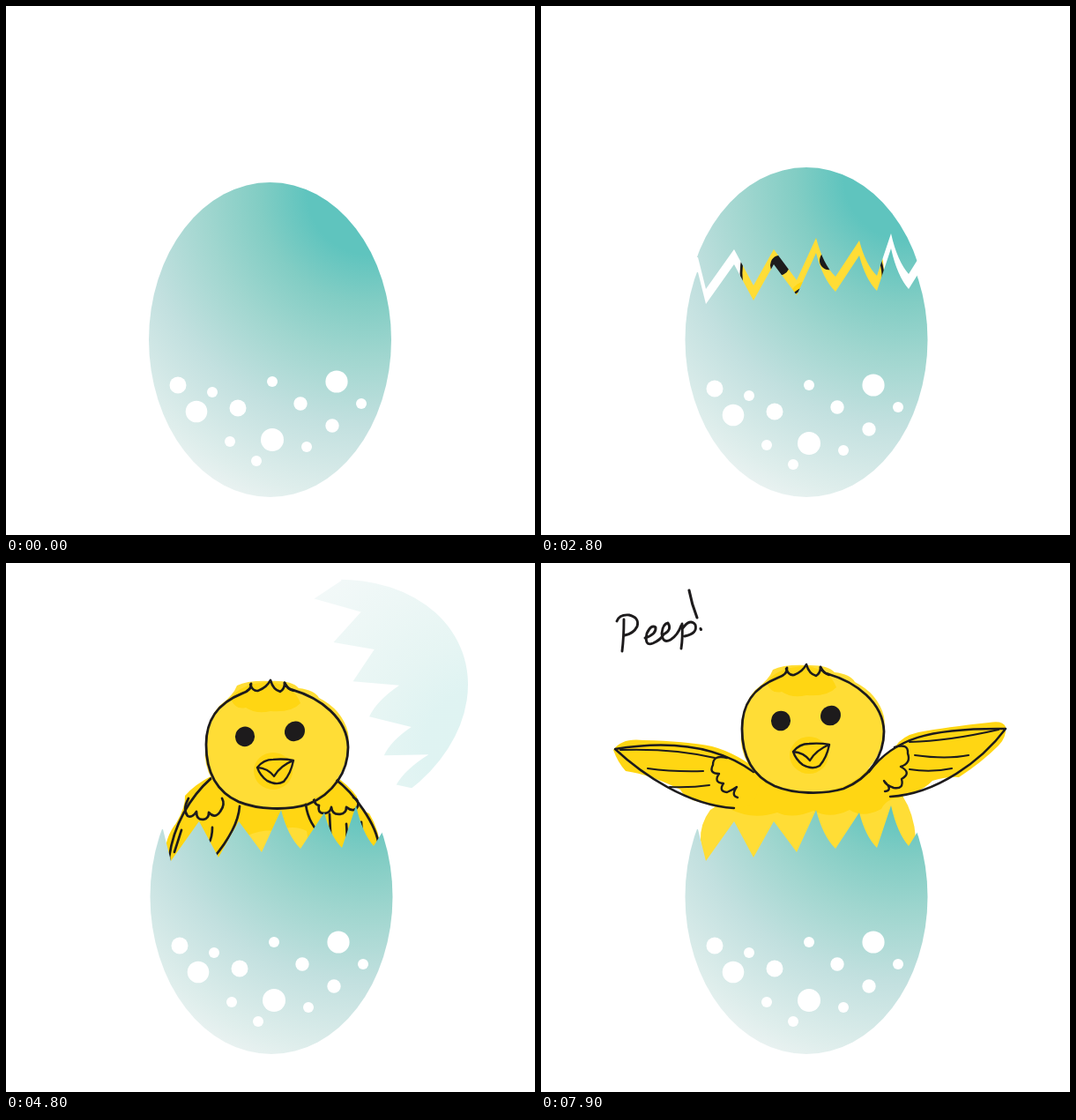
An HTML page with a canvas for the animation above (8000 ms loop, 600 by 600 pixels).

```html
<!DOCTYPE html>
<html lang="en">
<head>
<meta charset="utf-8">
<title>Hatching chick</title>
<style>
html, body { margin: 0; width: 100%; height: 100%; overflow: hidden; background: #fff; }
canvas { display: block; width: 100%; height: 100%; }
</style>
</head>
<body>
<canvas id="stage" width="600" height="600" role="img" aria-label="A chick hatches and says Peep!"></canvas>
<script>
const ctx = document.getElementById('stage').getContext('2d');
const LOOP = 8000, STEP = 200;
const INK = '#1d1b1c', YELLOW = '#ffdd36', GOLD = '#ffd613';
const RISE = 111;

const dots = [
  [195, 430, 9.5], [216, 460, 12.3], [234, 438, 6], [263, 456, 9.5], [302, 426, 6],
  [375, 426, 12.6], [334, 451, 7.7], [403, 451, 6], [370, 476, 7.7],
  [302, 492, 13], [341, 500, 6], [254, 494, 6], [284, 516, 6]
];
const teeth = [
  [178, 302], [187, 338], [219, 293], [241, 334], [264, 293], [290, 328], [312, 280],
  [334, 324], [361, 283], [381, 323], [397, 275], [417, 321], [427, 305]
];

const fill = (d, color) => { ctx.fillStyle = color; ctx.fill(new Path2D(d)); };
const line = (d, width = 2.7) => {
  ctx.strokeStyle = INK;
  ctx.lineWidth = width;
  ctx.stroke(new Path2D(d));
};
const oval = (x, y, rx, ry, color, turn = 0) => {
  ctx.fillStyle = color;
  ctx.beginPath();
  ctx.ellipse(x, y, rx, ry, turn, 0, Math.PI * 2);
  ctx.fill();
};
const at = (x, y, draw) => { ctx.save(); ctx.translate(x, y); draw(); ctx.restore(); };
const clamp = v => Math.min(1, Math.max(0, v));

const shade = ctx.createRadialGradient(412, 212, 70, 412, 212, 392);
shade.addColorStop(0, '#5fc4be');
shade.addColorStop(0.17, '#82cdc4');
shade.addColorStop(0.36, '#a0d6cf');
shade.addColorStop(0.6, '#c2e0df');
shade.addColorStop(0.86, '#dfeeec');
shade.addColorStop(1, '#f1f5f5');

const paintEgg = () => oval(299.5, 378.5, 137.5, 178.5, shade);
const paintDots = () => dots.forEach(([x, y, r]) => oval(x, y, r, r, '#fff'));

function egg(degrees) {
  ctx.save();
  ctx.translate(306, 380);
  ctx.rotate(degrees * Math.PI / 180);
  ctx.translate(-306, -380);
  paintEgg();
  paintDots();
  ctx.restore();
}

// One side of the jagged crack; edge is the far y of the clip.
function shellPart(edge) {
  ctx.save();
  ctx.beginPath();
  ctx.moveTo(140, edge);
  ctx.lineTo(140, 302);
  teeth.forEach(([x, y], i) => {
    const [px, py] = teeth[i - 1] || [140, 302];
    if (i > 6 && y > py) ctx.quadraticCurveTo(px + (x - px) * 0.35, py + (y - py) * 0.68, x, y);
    else ctx.lineTo(x, y);
  });
  ctx.lineTo(460, 305);
  ctx.lineTo(460, edge);
  ctx.clip();
  at(1.5, 0, paintEgg);
  ctx.restore();
}

function shell() {
  shellPart(600);
  at(2, 4, paintDots);
}

function cap(p, alpha) {
  ctx.save();
  ctx.globalAlpha = alpha;
  ctx.translate(302 + 153 * p, 250 - 125 * p);
  ctx.rotate(p * 70.4 * Math.PI / 180);
  ctx.translate(-302, -267);
  shellPart(150);
  ctx.restore();
}

function head() {
  fill('M226 195 Q226 166 242 148 Q258 136 262 125 Q274 119 300 120 Q324 119 332 128 Q350 130 355 139 Q381 152 388 178 Q392 204 377 229 Q352 264 301 265 Q254 264 234 232 Q224 215 226 195Z', YELLOW);
  fill('M255 140 Q265 122 300 121 Q326 124 334 145 Q324 156 300 154 Q284 158 272 150 Q260 153 255 140Z', GOLD);
  oval(303, 222, 22, 21, GOLD);
  line('M278 123 Q279 130 268 134 C238 146 227 166 227 192 C227 224 240 246 264 257 C286 266 318 267 342 260 C372 248 388 222 388 195 C387 162 356 139 325 130 Q319 129 316 122', 2.8);
  line('M277 124 Q280 132 286 131 Q296 127 300 119 Q303 130 311 132 Q316 129 316 122 Q319 129 326 131', 2.6);
  oval(271, 183, 11, 11.3, INK, 0.4);
  oval(327.5, 177, 11.8, 11, INK, -0.7);
  line('M285 218 Q292 209 303 209 Q316 208 326 210 Q323 225 315 234 Q307 239 296 233 Q288 227 285 218 Q297 219 304 228 Q311 216 326 210', 2.4);
}

function wingsDown() {
  fill('M236 240 L365 240 Q385 262 383 300 L366 352 L240 352 L226 300Z', GOLD);
  fill('M246 300 Q262 287 274 295 Q292 288 306 290 Q326 282 341 290 L352 352 L244 352Z', YELLOW);
  fill('M236 226 Q214 237 203 250 Q204 262 193 281 Q180 297 180 320 Q181 334 188 337 Q207 325 224 312 Q238 330 244 325 Q266 296 268 258Z', GOLD);
  fill('M371 226 Q389 238 398 251 Q399 266 412 270 Q424 290 425 313 Q420 324 412 318 L381 324 Q356 303 342 282 L338 258Z', GOLD);
  line('M233 230 C208 252 190 284 185 320 L187 332');
  line('M265 262 Q263 288 235 321');
  line('M207 253 Q200 266 206 273 Q211 276 216 268 Q216 278 224 277 Q230 276 230 269 Q237 277 243 268 Q249 260 245 253');
  line('M199 289 L191 314 M216 289 L211 309 M234 286 Q234 297 230 304');
  line('M373 231 C394 246 421 283 423 308 Q422 317 416 319');
  line('M340 260 Q343 283 361 298');
  line('M349 248 Q348 260 355 261 Q353 271 362 270 Q368 269 369 263 Q370 272 379 271 Q386 270 386 263 Q395 270 399 262 Q401 255 394 252');
  line('M367 271 L369 312 M386 282 Q388 304 384 313 M403 280 Q403 300 413 317');
}

function wingsUp() {
  fill('M222 246 Q204 274 192 280 Q180 296 181 315 L188 352 L415 352 L425 312 Q423 284 410 264 L385 232Z', YELLOW);
  fill('M215 245 L400 232 L411 266 Q392 266 386 279 Q365 290 350 280 Q328 291 309 281 Q285 291 268 283 Q240 292 214 279 Q202 276 215 245Z', GOLD);
  fill('M82 212 Q92 198 116 201 Q164 202 194 208 Q224 216 252 240 L240 275 Q202 282 186 272 Q165 270 158 257 Q124 240 96 236 Q87 226 82 212Z', GOLD);
  fill('M527 186 Q524 178 508 181 Q460 186 428 192 Q410 196 402 208 L366 240 L392 266 Q428 264 444 247 Q462 242 474 243 Q500 226 519 207 Q528 198 527 186Z', GOLD);
  line('M241 237 C200 207 145 201 84 211 C114 239 166 275 219 278', 2.4);
  line('M90 212 Q150 210 197 221 M121 233 Q150 237 184 236 M146 254 Q170 255 191 252', 2.1);
  line('M211 221 Q195 217 195 229 Q190 239 202 239 Q195 249 207 250 Q201 259 211 260 Q218 257 222 254 Q215 264 223 266', 2.4);
  line('M372 237 C400 199 440 187 527 188 C500 224 449 262 396 265', 2.4);
  line('M418 203 Q462 202 519 189 M424 218 Q460 223 485 218 M418 234 Q442 238 466 233', 2.1);
  line('M401 209 Q417 204 416 216 Q420 227 408 231 Q421 238 409 245 Q412 257 400 255 Q391 252 389 247 Q400 258 390 259', 2.4);
}

function chick(drop, up) {
  at(0, drop, () => {
    (up ? wingsUp : wingsDown)();
    at(up ? 1 : 0, up ? -4 : 0, head);
  });
}

function peep() {
  line('M94 64 Q94 84 92 100 M86 66 Q89 58 100 59 Q112 62 109 72 Q105 80 95 82', 2.9);
  line('M118 85 Q131 81 130 73 Q125 69 120 80 Q117 95 127 91 Q136 87 139 81 Q149 76 144 68 Q138 69 137 80 Q138 92 147 87 Q155 82 159 71', 2.9);
  line('M160 69 Q161 84 159 97 M160 75 Q169 62 175 70 Q178 80 163 83', 2.9);
  line('M168 31 Q171 47 177 62 M181 74.5 L181.5 75.5', 3.1);
}

// Wobble: right, centre, left, centre.
function tilt(t) {
  const k = (t - (t >= 1800 ? 1800 : 200)) / STEP;
  return k === 0 ? 15 : k === 2 ? -15 : 0;
}

function draw(now) {
  const time = now % LOOP;
  ctx.fillStyle = '#fff';
  ctx.fillRect(0, 0, 600, 600);
  ctx.lineCap = ctx.lineJoin = 'round';

  const t = Math.floor(time / STEP) * STEP;
  if (t < 2400) return egg(tilt(t));
  if (t < 2800) {
    at(1.5, 0, paintEgg);
    at(2, 4, paintDots);
    return;
  }

  const talking = (time >= 5500 && time < 6500) || time >= 7500;
  const up = talking && Math.floor((time - 5500) / STEP) % 2 === 0;
  chick(RISE * (1 - clamp((t - 3400) / 1600)), up);
  shell();
  if (t < 5000) cap(clamp((t - 2800) / 1000), 1 - clamp((t - 4000) / 1000));
  if (talking) peep();
}

let start;
function frame(now) {
  start ??= now;
  draw(now - start);
  requestAnimationFrame(frame);
}
draw(0);
requestAnimationFrame(frame);
</script>
</body>
</html>
```
